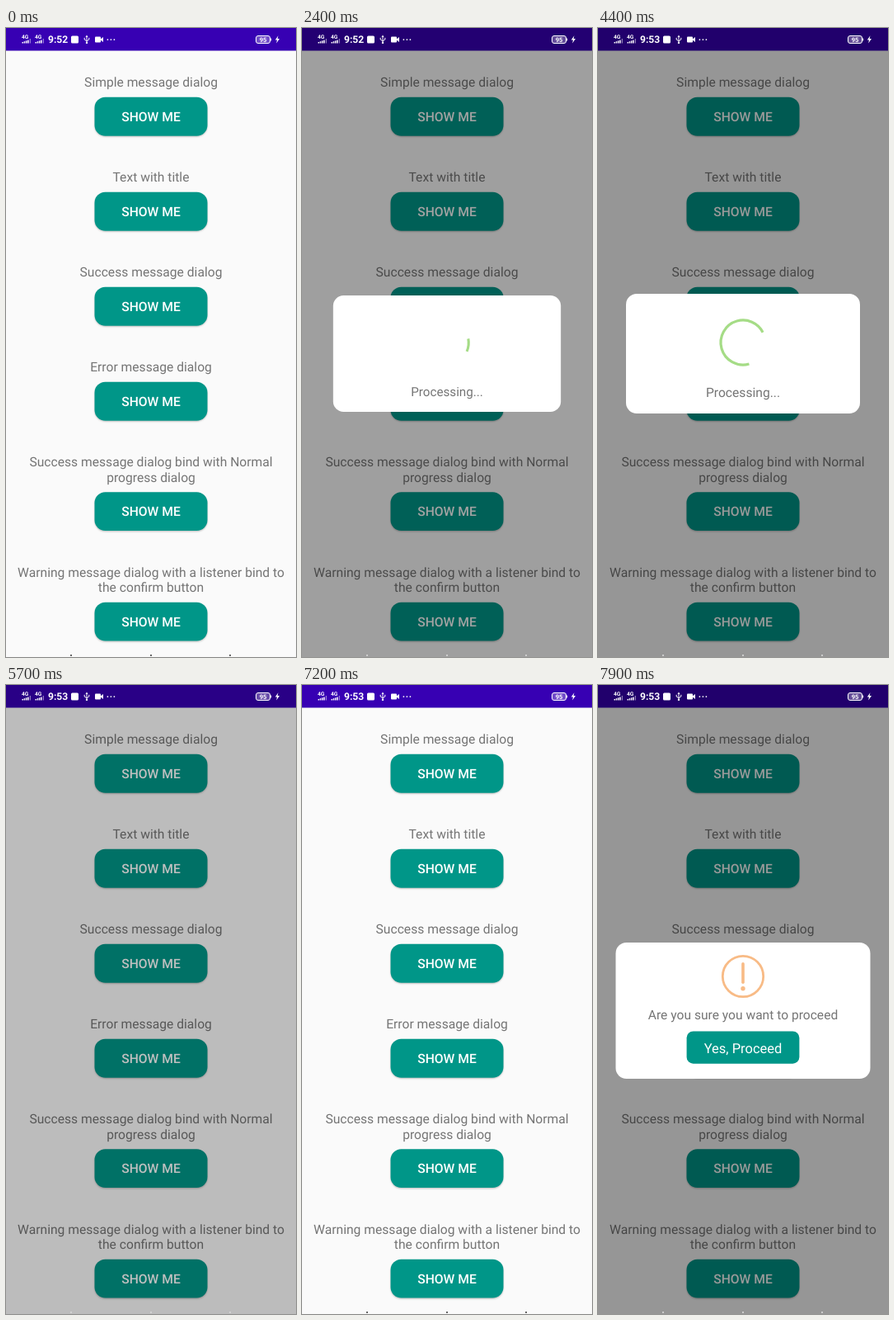
Write an HTML page with a canvas that moves like this. It is 352x762 px and loops after 8000 ms.

```html
<!DOCTYPE html>
<html lang="en">
<head>
<meta charset="utf-8">
<title>Dialog demo</title>
<style>
  html, body { margin: 0; width: 100%; height: 100%; overflow: hidden; background: #fafafa; }
  canvas { display: block; width: 352px; height: 762px; }
</style>
</head>
<body>
<canvas id="stage"></canvas>
<script>
const W = 352, H = 762, LOOP = 8000, STEP = 100, CX = W / 2, CY = 394.5;
const TEAL = '#009688', GREY = '#757575', GREEN = '#a5dc86', ORANGE = '#f8bb86';
const FONT = 'Roboto, "Noto Sans", sans-serif';
const canvas = document.getElementById('stage');
const ctx = canvas.getContext('2d');
const ratio = window.devicePixelRatio || 1;
canvas.width = W * ratio;
canvas.height = H * ratio;
ctx.textRendering = 'geometricPrecision';

const rows = [
  [83.8, 'Simple message dialog'],
  [198.8, 'Text with title'],
  [313.8, 'Success message dialog'],
  [428.8, 'Error message dialog'],
  [562.2, 'Success message dialog bind with Normal', 'progress dialog'],
  [695.7, 'Warning message dialog with a listener bind to', 'the confirm button']
];

const clamp = x => Math.max(0, Math.min(1, x));
const ease = x => 0.5 - Math.cos(clamp(x) * Math.PI) / 2;
const mix = (a, b, k) => a + (b - a) * k;
const rad = deg => deg * Math.PI / 180;

function text(str, x, y, size, color, weight = 400, align = 'center') {
  ctx.font = `${weight} ${size}px ${FONT}`;
  ctx.textAlign = align;
  ctx.fillStyle = color;
  ctx.fillText(str, x, y);
}

function rect(x, y, w, h, color) {
  ctx.fillStyle = color;
  ctx.fillRect(x, y, w, h);
}

function box(x, y, w, h, r, color) {
  ctx.beginPath();
  ctx.roundRect(x, y, w, h, r);
  ctx.fillStyle = color;
  ctx.fill();
}

function arc(x, y, r, from, to, width, color) {
  ctx.beginPath();
  ctx.arc(x, y, r, rad(from), rad(to));
  ctx.lineWidth = width;
  ctx.strokeStyle = color;
  ctx.stroke();
}

function poly(points, color) {
  ctx.beginPath();
  points.forEach(([x, y]) => ctx.lineTo(x, y));
  ctx.fillStyle = color;
  ctx.fill();
}

function page() {
  rect(0, 0, W, H, '#fafafa');
  rect(0, 0, W, 27.5, '#3700b3');
  for (const [y, ...lines] of rows) {
    lines.forEach((line, i) => {
      text(line, CX, y - 12.4 - (lines.length - 1 - i) * 18.5, 15.65, GREY);
    });
    ctx.save();
    ctx.shadowColor = 'rgba(0,0,0,.22)';
    ctx.shadowBlur = 2 * ratio;
    ctx.shadowOffsetY = 1.2 * ratio;
    box(107.5, y, 137, 46.9, 13, TEAL);
    ctx.restore();
    text('SHOW ME', CX, y + 29.2, 15.65, '#fff', 500);
  }
}

function signal(x) {
  text('4G', x, 13.3, 6.6, '#fff', 700, 'left');
  for (let i = 0; i < 4; i++) {
    rect(x + 0.5 + i * 2.2, 17 - i * 0.8, 1.5, 1.5 + i * 0.8, '#fff');
  }
  rect(x + 9.8, 13, 1, 5.5, 'rgba(255,255,255,.6)');
}

function statusBar(time) {
  signal(19);
  signal(35);
  text(time, 51, 18.2, 12.1, '#fff', 700, 'left');
  box(79, 9.5, 9, 9, 1.5, '#fff');

  // USB
  rect(97.5, 10, 1, 8, '#fff');
  poly([[98, 8.5], [96.5, 11], [99.5, 11]], '#fff');
  ctx.beginPath();
  ctx.moveTo(95.2, 11.8);
  ctx.lineTo(95.2, 14);
  ctx.lineTo(98, 15.8);
  ctx.lineTo(100.8, 14);
  ctx.lineTo(100.8, 11.8);
  ctx.lineWidth = 1;
  ctx.strokeStyle = '#fff';
  ctx.stroke();
  box(96.8, 16.7, 2.4, 2.4, 1.2, '#fff');

  // Camera
  box(108, 10.5, 7, 7, 1, '#fff');
  poly([[115, 13.3], [118, 11], [118, 17], [115, 14.7]], '#fff');

  for (let i = 0; i < 3; i++) box(122.5 + i * 4, 13.2, 1.8, 1.8, 0.9, '#fff');

  // Battery
  box(303.5, 9.5, 17, 9, 2.5, 'rgba(255,255,255,.3)');
  ctx.lineWidth = 1;
  ctx.strokeStyle = '#fff';
  ctx.stroke();
  rect(321.2, 12.5, 1, 3, '#fff');
  text('95', 312, 16.8, 7.6, '#fff', 700);
  poly([[330.4, 9.3], [326.8, 14.6], [329, 14.6], [328.2, 18.6], [332, 13], [329.6, 13]], '#fff');
}

function navBar(color) {
  for (const x of [79, 176, 272]) rect(x - 1, 759, 2, 2, color);
}

// Bar grows and shrinks while the wheel turns
function wheel(t) {
  const pause = 213, swing = 460, half = pause + swing, range = 254;
  const turns = Math.floor(t / (2 * half));
  const rest = t - turns * 2 * half;
  const shrinking = rest >= half;
  const k = ease((rest % half - pause) / swing);
  const extra = range * (shrinking ? 1 - k : k);
  const from = t * 0.27 + range * (turns + (shrinking ? k : 0)) - 90;
  arc(CX, 381, 27, from, from + 16 + extra, 3.2, GREEN);
}

function progressDialog(t) {
  box(34, 322, 284, 145, 13, '#fff');
  wheel(t + 16);
  text('Processing...', CX, 447.4, 15.65, GREY);
}

function warningDialog() {
  box(21.5, 312, 309, 165, 13, '#fff');
  arc(CX, 353, 24.7, 0, 360, 2.8, ORANGE);
  box(174.2, 336, 3.6, 26, 1.8, ORANGE);
  box(173.3, 365, 5.4, 5.4, 2.7, ORANGE);
  text('Are you sure you want to proceed', CX, 405.2, 15.6, GREY);
  box(107.6, 419.5, 136.8, 39.2, 8, TEAL);
  text('Yes, Proceed', CX, 445.6, 16.5, '#fff');
}

function popScale(t) {
  if (t < 135) return mix(0.7, 1.05, ease(t / 135));
  if (t < 247) return mix(1.05, 0.95, ease((t - 135) / 112));
  return mix(0.95, 1, ease((t - 247) / 63));
}

const dialogs = [
  { open: 2123, close: 5540, draw: progressDialog },
  { open: 7211, close: Infinity, draw: warningDialog }
];

function showDialog({ open, close, draw }, t) {
  const age = t - open;
  const out = t - close;
  const leave = ease(out / 150);
  const dim = 0.4 * Math.min(1, (age / 290) ** 2) * (1 - ease(out / 380));
  rect(0, 0, W, H, `rgba(0,0,0,${dim})`);
  if (dim > 0.1) navBar(`rgba(255,255,255,${dim * 1.3})`);
  if (leave >= 1) return;
  const scale = popScale(age) * mix(1, 0.7, leave);
  ctx.save();
  ctx.globalAlpha = mix(0.2, 1, ease(age / 96)) * (1 - leave);
  ctx.translate(CX, CY);
  ctx.scale(scale, scale);
  ctx.translate(-CX, -CY);
  draw(age);
  ctx.restore();
}

function render(now) {
  const t = Math.floor((now % LOOP) / STEP) * STEP;
  ctx.setTransform(ratio, 0, 0, ratio, 0, 0);
  page();
  const active = dialogs.find(d => t >= d.open && t < d.close + 380);
  if (active) showDialog(active, t);
  else navBar('#666');
  statusBar(t < 3400 ? '9:52' : '9:53');
}

let start;
function tick(now) {
  start ??= now;
  render(now - start);
  requestAnimationFrame(tick);
}
render(0);
requestAnimationFrame(tick);
</script>
</body>
</html>
```
